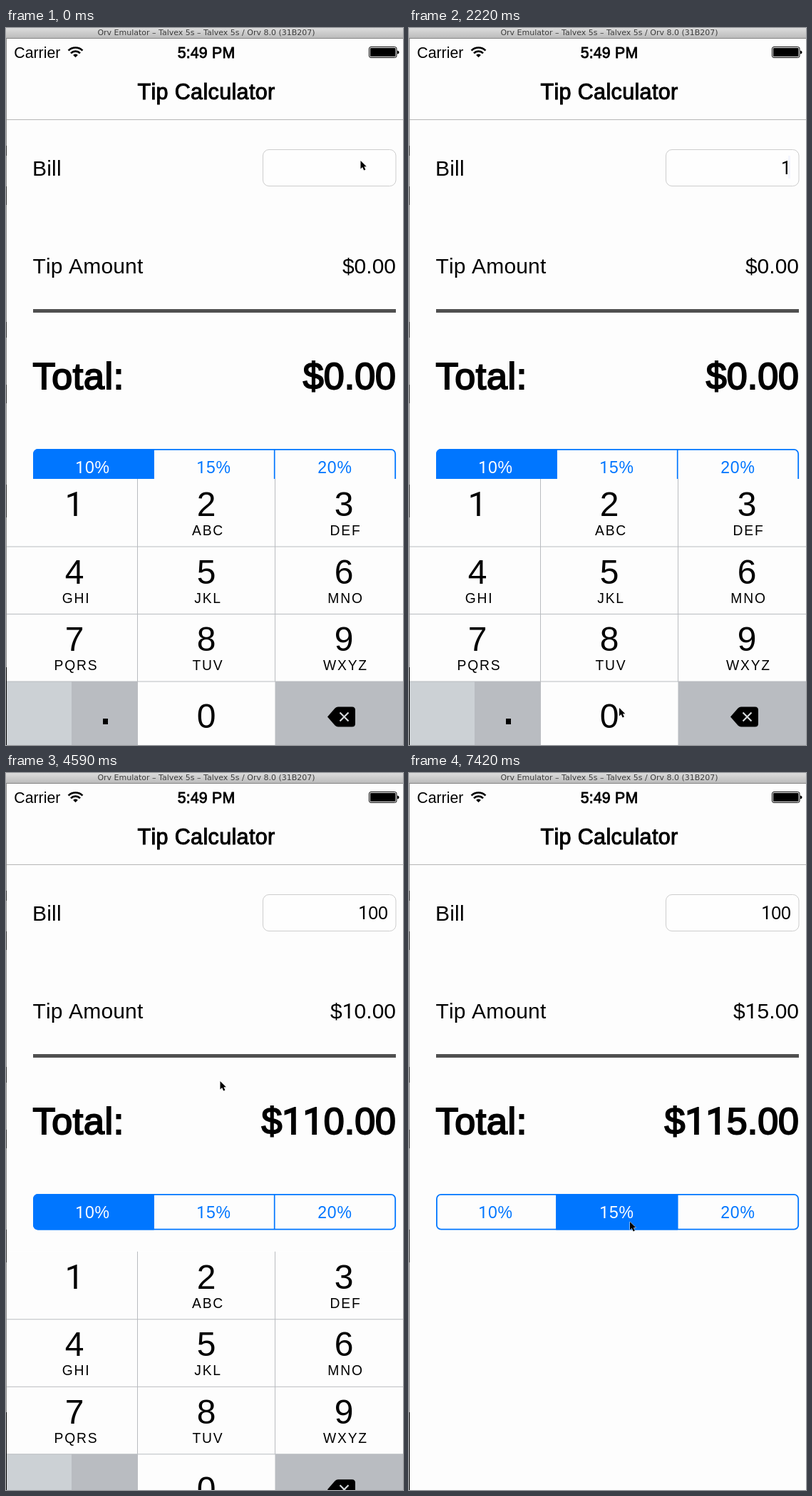
These frames come from a looping animation (557 px wide and 1005 px high, 8000 ms). An HTML page:

```html
<!DOCTYPE html>
<html lang="en">
<head>
<meta charset="utf-8">
<title>Tip Calculator</title>
<style>
  html, body { margin: 0; width: 100%; height: 100%; overflow: hidden; background: #fdfdfd; }
  svg { display: block; width: 100%; height: 100%; }
  text { font-family: "Liberation Sans", Arial, sans-serif; font-kerning: none; }
  .one { font-family: Roboto, sans-serif; }
  .bar { font: 11px "DejaVu Sans", sans-serif; fill: #3c3c3c; }
  .status { font-size: 21.3px; }
  .label { font-size: 30px; }
  .title { font-size: 30.5px; letter-spacing: .35px; stroke: #000; stroke-width: 1; }
  .total { font-size: 52px; stroke: #000; stroke-width: 2; }
  .kern { font-kerning: normal; letter-spacing: .7px; }
  .field { font-size: 25px; }
  .seg { font-size: 23px; letter-spacing: .8px; }
  .digit { font-size: 48px; }
  .abc { font-size: 19.3px; letter-spacing: 1.8px; }
  .end { text-anchor: end; }
  .mid { text-anchor: middle; }
</style>
</head>
<body>
<svg viewBox="0 0 557 1005">
  <defs>
    <linearGradient id="chrome" x2="0" y2="1">
      <stop offset="0" stop-color="#dcdcdc"/><stop offset="1" stop-color="#b9b9b9"/>
    </linearGradient>
    <clipPath id="round"><rect x="38" y="590" width="509" height="50.5" rx="7"/></clipPath>
  </defs>
  <rect width="557" height="1005" fill="#fdfdfd"/>
  <rect width="557" height="15" fill="url(#chrome)"/>
  <rect y="14" width="557" height="1" fill="#858585"/>
  <text class="bar mid" x="281" y="10">Orv Emulator – Talvex 5s – Talvex 5s / Orv 8.0 (31B207)</text>

  <text class="status" x="11.3" y="41.5">Carrier</text>
  <path d="M87.6 31.6a14 14 0 0 1 19.8 0M91 35.4a9.2 9.2 0 0 1 13 0" fill="none" stroke="#000" stroke-width="2.7"/>
  <path d="M97.5 41.3l-3.3-3.4a4.7 4.7 0 0 1 6.6 0z"/>
  <text class="status mid" x="281" y="41.5" stroke="#000" stroke-width=".8" letter-spacing=".2">5:49 PM</text>
  <rect x="509.5" y="26.5" width="38.5" height="15" rx="2.5" fill="none" stroke="#000"/>
  <rect x="511" y="28" width="35.5" height="12" rx="1"/>
  <path d="M549 31.5q2.6.5 2.6 2.5t-2.6 2.5z"/>

  <text class="title mid" x="281" y="100">Tip Calculator</text>
  <rect y="128" width="557" height="1" fill="#b6b6b6"/>
  <text class="label" x="37" y="207" letter-spacing=".2">Bill</text>
  <rect x="360.5" y="170.5" width="186.5" height="51" rx="8.5" fill="#fefefe" stroke="#cdcdcd"/>
  <text class="field end" id="bill" x="536" y="204.5"></text>
  <rect id="caret" x="532" y="179" width="3" height="32" fill="#4466e8"/>
  <text class="label" x="37.5" y="344" letter-spacing=".15">Tip Amount</text>
  <text class="label end" id="tip" x="547" y="344"></text>
  <rect x="38" y="394" width="509" height="5" fill="#505050"/>
  <text class="total kern" x="37.5" y="505.5">Total:</text>
  <text class="total end" id="total" x="547" y="505.5"></text>

  <g id="segments" clip-path="url(#round)"></g>
  <path d="M207 590v50M376.7 590v50" stroke="#0076ff" stroke-width="1.7"/>
  <rect x="38.9" y="590.9" width="507.3" height="48.8" rx="6" fill="none" stroke="#0076ff" stroke-width="1.8"/>

  <g id="keyboard"></g>
  <path d="M.5 15V896" stroke="#8a8a8a"/>
  <path d="M.5 896V1005" stroke="#000"/>
  <path d="M.5 165v14M.5 222v26M.5 412v22M.5 500v26M.5 640v46" stroke="#333"/>
  <path id="mouse" d="M0 0V11.4L2.6 9 4.7 13.6 6.9 12.6 4.9 8.2H8.3Z" stroke="#fff" paint-order="stroke"/>
</svg>
<script>
const LOOP = 8000, TICK = 148.3, LEAD = 20;
const $ = id => document.getElementById(id);
const rect = (x, y, w, h, fill, id = "") =>
  `<rect ${id && `id="${id}"`} x="${x}" y="${y}" width="${w}" height="${h}" fill="${fill}"/>`;
// The figure 1 is set without a foot.
const figures = s => String(s).replace(/1/g, '<tspan class="one">1</tspan>');
const text = (cls, x, y, s, id = "") =>
  `<text ${id && `id="${id}"`} class="${cls} mid" x="${x}" y="${y}">${figures(s)}</text>`;

$("segments").innerHTML = [10, 15, 20].map((rate, i) =>
  rect(37 + i * 169.4, 590, 170.6, 51, "#0076ff", "fill" + i) +
  text("seg", 121.5 + i * 170, 624, rate + "%", "rate" + i)).join("");

function buildKeyboard() {
  const cols = [96, 281, 474];
  const letters = ["", "ABC", "DEF", "GHI", "JKL", "MNO", "PQRS", "TUV", "WXYZ"];
  let out = rect(1, 632, 556, 373, "#fdfdfd") +
    rect(1, 632, 184, 95, "#b9bcc1", "key1") +
    rect(1, 916, 91, 89, "#ccd1d5") +
    rect(92, 916, 93, 89, "#b9bcc1") +
    rect(185, 916, 193, 89, "#b9bcc1", "key0") +
    rect(377.5, 916, 179.5, 89, "#b9bcc1");
  letters.forEach((abc, i) => {
    const x = cols[i % 3], y = Math.floor(i / 3) * 94.6;
    out += text("digit", x, 684 + y, i + 1) + text("abc", x + 2.5, 711 + y, abc);
  });
  out += text("digit", 281, 981, 0) + rect(136, 968, 7, 8, "#000");
  out += `<path d="M184.5 632V916M377.5 632V916M1 727H557M1 821.5H557M1 916H557" stroke="#b9bcc0"/>
    <path d="M451 965.5L461.5 953.5Q463.5 951.5 466 951.5H485.5Q490 951.5 490 956V975Q490 979.5 485.5 979.5H466Q463.5 979.5 461.5 977.5Z"/>
    <path d="M468.5 959.5l12 12m0-12l-12 12" stroke="#d5d8db" stroke-width="2.2"/>`;
  $("keyboard").innerHTML = out;
}
buildKeyboard();

// Pointer stops: [tick, x, y]
const stops = [
  [2, 497.5, 186], [9, 95.5, 664], [11, 95.5, 664], [15, 295, 953], [22, 295, 953],
  [25, 325, 502], [29, 300.5, 432], [38, 300.5, 432], [42, 308.5, 646],
  [45, 309, 630], [47, 309, 630], [50, 310, 629]
];
// Caret opacity: [tick, value]
const blinks = [[0, 0], [3, 1], [7, 0], [10, 1], [14, .6], [15, .06], [17, 1], [25, 0], [28, 1], [31, 0]];
const typed = [[0, ""], [11, "1"], [17, "10"], [20, "100"]];

const smooth = p => p * p * (3 - 2 * p);
const clamp = p => Math.max(0, Math.min(1, p));
const latest = (list, k) => list.filter(e => e[0] <= k).pop()[1];
const money = n => figures("$" + n.toFixed(2));

function pointer(k) {
  const i = stops.findIndex(s => s[0] > k);
  if (i === 0) return stops[0].slice(1);
  if (i < 0) return stops[stops.length - 1].slice(1);
  const a = stops[i - 1], b = stops[i];
  const p = smooth((k - a[0]) / (b[0] - a[0]));
  return [a[1] + (b[1] - a[1]) * p, a[2] + (b[2] - a[2]) * p];
}

const show = (id, on) => $(id).setAttribute("opacity", +on);

function draw(k) {
  $("mouse").setAttribute("transform", `translate(${pointer(k)})`);
  $("bill").innerHTML = figures(latest(typed, k));
  show("caret", latest(blinks, k));
  show("key1", k === 10);
  show("key0", k === 17 || k === 20);

  const bill = k < 31 ? 0 : 100, tip = bill * (k < 45 ? .1 : .15);
  $("tip").innerHTML = money(tip);
  $("total").innerHTML = money(bill + tip);

  const drop = smooth(clamp((k - 30.5) / 2.5));
  $("keyboard").setAttribute("transform", `translate(0 ${drop * 373})`);
  show("keyboard", drop < 1);

  const swap = k < 45 ? 0 : k < 46 ? .6 : 1;
  const tint = k === 44 ? .15 : swap;
  [1 - swap, tint, 0].forEach((v, i) => {
    show("fill" + i, v);
    $("rate" + i).setAttribute("fill", v > .5 ? "#fff" : "#0076ff");
  });
}

let last = -1;
function loop() {
  const k = Math.floor((performance.now() % LOOP + LEAD) / TICK);
  if (k !== last) draw(last = k);
  requestAnimationFrame(loop);
}
loop();
</script>
</body>
</html>
```
